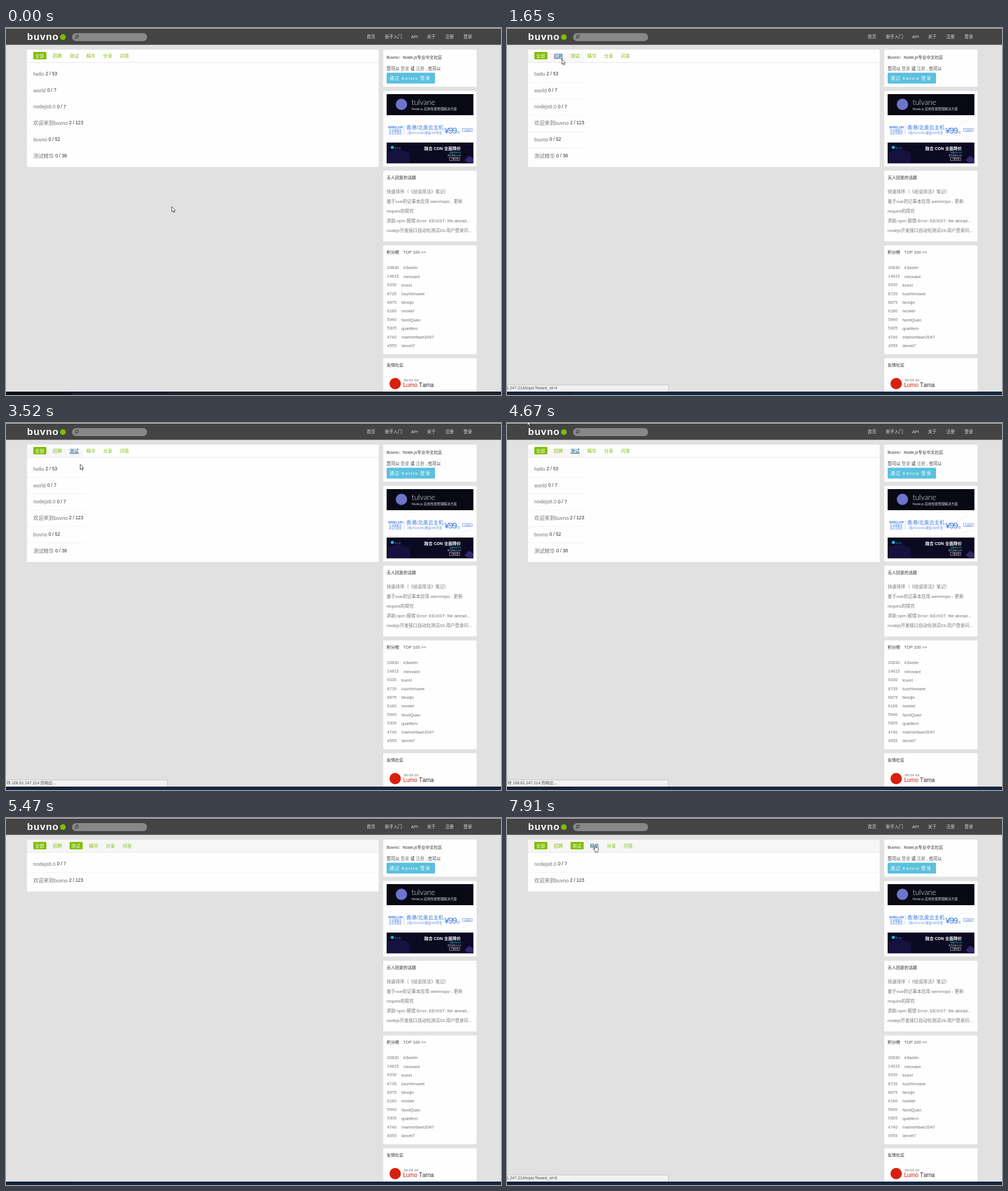
These frames come from a looping animation (870x644 px, 8000 ms). An HTML page:

```html
<!DOCTYPE html>
<html lang="zh-CN">
<head>
<meta charset="utf-8">
<title>Forum tabs</title>
<style>
  html, body { margin: 0; width: 100%; height: 100%; overflow: hidden; background: #e1e1e1; }
  svg { display: block; width: 870px; height: 644px; }
  text {
    font-family: "Liberation Sans", "Noto Sans CJK SC", "Noto Sans CJK", sans-serif;
    font-kerning: none; text-spacing-trim: space-all; white-space: pre;
  }
</style>
</head>
<body>
<svg viewBox="0 0 870 644"><g id="page"></g><g id="live"></g></svg>
<script>
const LOOP = 8000;
const GREEN = '#80bd01', GREY = '#767676', DARK = '#2d2d2d', HOVER = '#005580', BLUE = '#3c7be0';

const rect = (x, y, w, h, fill, extra = '') =>
  `<rect x="${x}" y="${y}" width="${w}" height="${h}" fill="${fill}" ${extra}/>`;
const text = (x, y, size, fill, str, extra = '') =>
  `<text x="${x}" y="${y}" font-size="${size}" fill="${fill}" ${extra}>${str}</text>`;
const disc = (x, y, r, fill) => `<circle cx="${x}" cy="${y}" r="${r}" fill="${fill}"/>`;
const path = (d, extra) => `<path d="${d}" ${extra}/>`;
const card = (y, h) => rect(663, y, 164, h, '#fefefe', 'rx="1.5"');
const BOLD = 'font-weight="bold"';

function header() {
  const nav = [[634, '首页'], [666, '新手入门'], [712, 'API'], [740, '关于'], [772, '注册'], [804, '登录']];
  return rect(0, 0, 870, 1, '#d4d4d4') + rect(0, 1, 870, 28.5, '#444') +
    text(37, 21, 17, '#fff', 'buvno', BOLD + ' letter-spacing="1"') + disc(100, 16, 5, GREEN) +
    rect(116, 9, 132, 14, '#888', 'rx="7"') +
    path('M121 19L123 16.5M122.4 14.8a2.4 2.4 0 1 1 4.8 0a2.4 2.4 0 1 1-4.8 0', 'fill="none" stroke="#3c3c3c" stroke-width="1.1"') +
    nav.map(([x, s]) => text(x, 18.2, 7.5, '#dcdcdc', s)).join('');
}

function welcomeCard() {
  const link = s => `<tspan fill="${GREY}">${s}</tspan>`;
  return card(38, 65) +
    text(669, 53.6, 7.4, DARK, 'Buvno：Node.js专业中文社区') +
    text(669, 74, 7.5, DARK, `您可以 ${link('登录')} 或 ${link('注册')} , 也可以`) +
    rect(669, 78.5, 85, 19, '#5bc0de', 'rx="1.5"') +
    text(674, 91.2, 8, '#fff', '通过 Kelvro 登录', 'letter-spacing="1.1"');
}

function banners() {
  return card(110.5, 132.5) +
    rect(669, 116, 152.5, 37, '#090914') +
    disc(695, 134, 10, '#6d74cc') +
    text(713, 134.5, 13, '#eef', 'tulvane', 'style="font-family:Lato,sans-serif;font-weight:300"') +
    text(713, 144, 5.8, '#ddd', 'Node.js 应用性能管理解决方案') +

    text(672, 175.5, 6.1, BLUE, 'BRELUN', BOLD) +
    text(673, 180.5, 4.5, BLUE, '企业级服务') + text(673, 186, 4.5, BLUE, '安全又稳定') +
    rect(699.5, 171, .6, 16, '#9dbcf0') +
    text(703.5, 178.3, 9, BLUE, '香港/北美云主机') +
    text(705, 186, 5.3, '#5e92e6', '2核/4G/100G硬盘/3M带宽') +
    text(770.5, 185, 15, BLUE, '¥99', 'letter-spacing="-1.4"') +
    text(792, 185, 4.5, BLUE, '/月') +
    rect(802.5, 176.5, 17, 5, 'none', `stroke="${BLUE}" stroke-width=".6"`) +
    text(805, 180.5, 3.2, BLUE, '立即购买') +
    path('M796 169L812 161M806 193L821 186M800 194L811 188', 'stroke="#e3ecfb" stroke-width=".7"') +

    rect(669, 201, 152.5, 36.5, '#0c0a22') +
    path('M671 237V218L690 212L710 220V237Z', 'fill="#17113f"') +
    path('M806 232L814 224L821 229V236H812Z', 'fill="#352675"') +
    disc(679, 209.5, 2.8, '#16b6e8') + text(683, 211.5, 3.6, '#16b6e8', '禾川台') +
    text(735, 214, 7.4, '#fff', '融合 CDN 全面降价', BOLD) +
    text(779, 220.3, 3.6, '#1fd2dd', '流量低至 8折') + text(776, 224.6, 3.6, '#d8d8e8', '首月体验 0.2元') +
    rect(779.5, 227, 18, 5.5, 'none', 'stroke="#ddd" stroke-width=".6"') +
    text(782, 231.2, 3.3, '#fff', '了解详情');
}

function unanswered() {
  const topics = ['快速排序（《绘说排法》笔记）', '基于vue的记事本应用 wenmopo - 更新', 'require的探究',
    '求助:npm 报错 Error: EEXIST: file alread...', 'nodejs开发接口自动化测试03-用户登录问...'];
  return card(250.5, 124) + text(669, 264.6, 7.4, DARK, '无人回复的话题') +
    topics.map((s, i) => text(669, 290 + 17 * i, 7.8, GREY, s)).join('');
}

function ranking() {
  const users = [[20830, 'k3wolm'], [14815, 'mirovant'], [9330, 'tovrel'], [8735, 'luozhimuwei'], [6875, 'bexqlo'],
    [6180, 'ivoskel'], [5940, 'NorilQuan'], [5305, 'quietfern'], [4740, 'marinerfawn2047'], [4555, 'lanvet7']];
  return card(381.5, 191) + text(669, 396, 7.4, DARK, '积分榜') + text(698, 396, 7.4, '#555', 'TOP 100 &gt;&gt;') +
    users.map(([score, name], i) => {
      const y = 423 + 15.2 * i;
      return text(669.8, y, 7.4, GREY, score) + text(score > 9999 ? 698.7 : 695, y + .4, 7.4, '#6c7077', name);
    }).join('');
}

function friends() {
  return card(579.5, 60) + text(669, 594, 7.4, DARK, '友情社区') + disc(684, 624, 10, '#d8200c') +
    text(699, 620, 4, '#666', '同好 技术 社区') +
    text(698, 630, 10, DARK, '<tspan fill="#c8200f">Lumo</tspan> Tarna');
}

const TABS = ['全部', '招聘', '测试', '精华', '分享', '问答'];

// hover maps a tab index to whether its underline is visible
function tabs(selected, hover) {
  let x = 48;
  return TABS.map((name, i) => {
    const on = selected.includes(i), left = x;
    x += on ? 34.2 : 29.5;
    if (on) return rect(left, 42, 23, 13, GREEN, 'rx="1.5"') + text(left + 3, 51.9, 8, '#fff', name);
    const line = hover[i] ? 'text-decoration="underline"' : '';
    return text(left, 51.9, 8, i in hover ? HOVER : GREEN, name, line);
  }).join('');
}

const TOPICS = [['hello', 69.5, '2 / 53'], ['world', 72.5, '0 / 7'], ['nodejs8.0', 89.5, '0 / 7'],
  ['欢迎来到buvno', 110.7, '2 / 123'], ['buvno', 74.7, '0 / 52'], ['测试精华', 86.7, '0 / 38']];

function board(t) {
  const filtered = t >= 4790, visited = t >= 1260;
  const rows = filtered ? TOPICS.slice(2, 4) : TOPICS;
  const hover = {};
  if (t >= 1260 && t < 2550) hover[1] = true;
  if (t >= 2190 && !filtered) hover[2] = t >= 2550;
  if (t >= 7610) hover[3] = false;

  let out = rect(37, 38, 618, filtered ? 91 : 206, '#fefefe', 'rx="1.5"');
  if (filtered) out += rect(37, 38, 618, 22, '#f6f6f6', 'rx="1.5"');
  else if (visited) out += rect(37, 45, 98, 15, '#f7f7f7');
  out += rect(37, 60, 618, 1, '#e8e8e8') + tabs(filtered ? [0, 2] : [0], hover);
  rows.forEach(([title, x, count], i) => {
    const y = 28.8 * i;
    if (i && visited) out += rect(37, 66.2 + y, filtered ? 618 : 104, .8, '#f1f1f1');
    out += text(48, 83.8 + y, 9, GREY, title) + text(x, 83 + y, 8.2, DARK, count);
  });
  return out;
}

function statusBar(t) {
  const boardUrl = id => `1.247.214/topic?board_id=${id}`;
  let label, alpha = 1, x = -1, size = 7.2;
  if (t >= 1260 && t < 1770) label = boardUrl(4);
  else if (t >= 2190 && t < 2670) label = boardUrl(5);
  else if (t >= 2670 && t < 5470) {
    label = '等待 108.61.247.214 的响应...';
    x = -6; size = 7;
    alpha = t < 5190 ? 1 : t < 5320 ? .6 : .3;
  } else if (t >= 7760) {
    label = boardUrl(6);
    alpha = t < 7910 ? .7 : 1;
  }
  return label ? `<g opacity="${alpha}">` +
    rect(-2, 626.5, 285.5, 12, '#f2f2f2', 'stroke="#c6c6c6"') + text(x, 634.4, size, '#4a4a4a', label) + '</g>' : '';
}

function taskbar(t) {
  return t < 1260
    ? rect(0, 638, 870, 6, '#1b212c') + rect(0, 639, 115, 5, '#0e0f1c') + rect(116, 638, 170, 2, '#11113a')
    : rect(0, 638, 870, 6, '#152640') + rect(0, 639, 115, 5, '#14223a');
}

// time, left, top, and 1 for the hand pointer; no position means hidden
const POINTER = [
  [0, 291, 313], [120, 274, 305], [270, 258, 284], [390, 234, 253], [540, 140, 153], [690, 132, 135],
  [840, 129, 75], [990, 113, 58], [1110, 102, 47], [1260, 93, 46, 1], [1510, 90, 48, 1], [1650, 96, 54],
  [1770, 102, 58], [1920, 110, 66], [2040, 117, 71], [2190, 115, 55, 1], [2310, 115, 52, 1], [2790, 116, 56],
  [2940, 128, 65], [3370, 130, 70], [3520, 130, 72], [3640, 130, 74], [3790, 130, 73], [3940, 144, 58],
  [4090, 146, 47], [4400, 141, 39], [4520, 135, 33], [4670, 35.5, -5.5], [4790],
  [7090, 117, 68], [7210, 130, 92], [7330, 143, 72], [7480, 148, 60], [7610, 151, 47, 1]
];
const ARROW = 'M.4.4V9.6L2.4 7.8L3.9 11L5.3 10.3L3.9 7.2H6.7Z';
const HAND = 'M3.2 1.3Q4.2-.2 5.1 1.3V4.8L8.8 5.5Q10 5.9 9.8 7.2L9 10.8V12.8H4V11.2L.7 8Q.4 6.6 1.7 6.8L3.2 7.9Z';

function pointer(t) {
  const [, x, y, hand] = POINTER.findLast(key => key[0] <= t);
  if (x === undefined) return '';
  return path(hand ? HAND : ARROW,
    `transform="translate(${x} ${y})" fill="#fff" stroke="#222" stroke-width=".8" stroke-linejoin="round"`);
}

const page = document.getElementById('page'), live = document.getElementById('live');
page.innerHTML = rect(0, 0, 870, 644, '#e1e1e1') + header() + welcomeCard() + banners() + unanswered() + ranking() + friends();

let shown = '';
function draw() {
  const t = performance.now() % LOOP;
  const next = board(t) + statusBar(t) + taskbar(t) + pointer(t);
  if (next !== shown) live.innerHTML = shown = next;
  requestAnimationFrame(draw);
}
draw();
</script>
</body>
</html>
```
